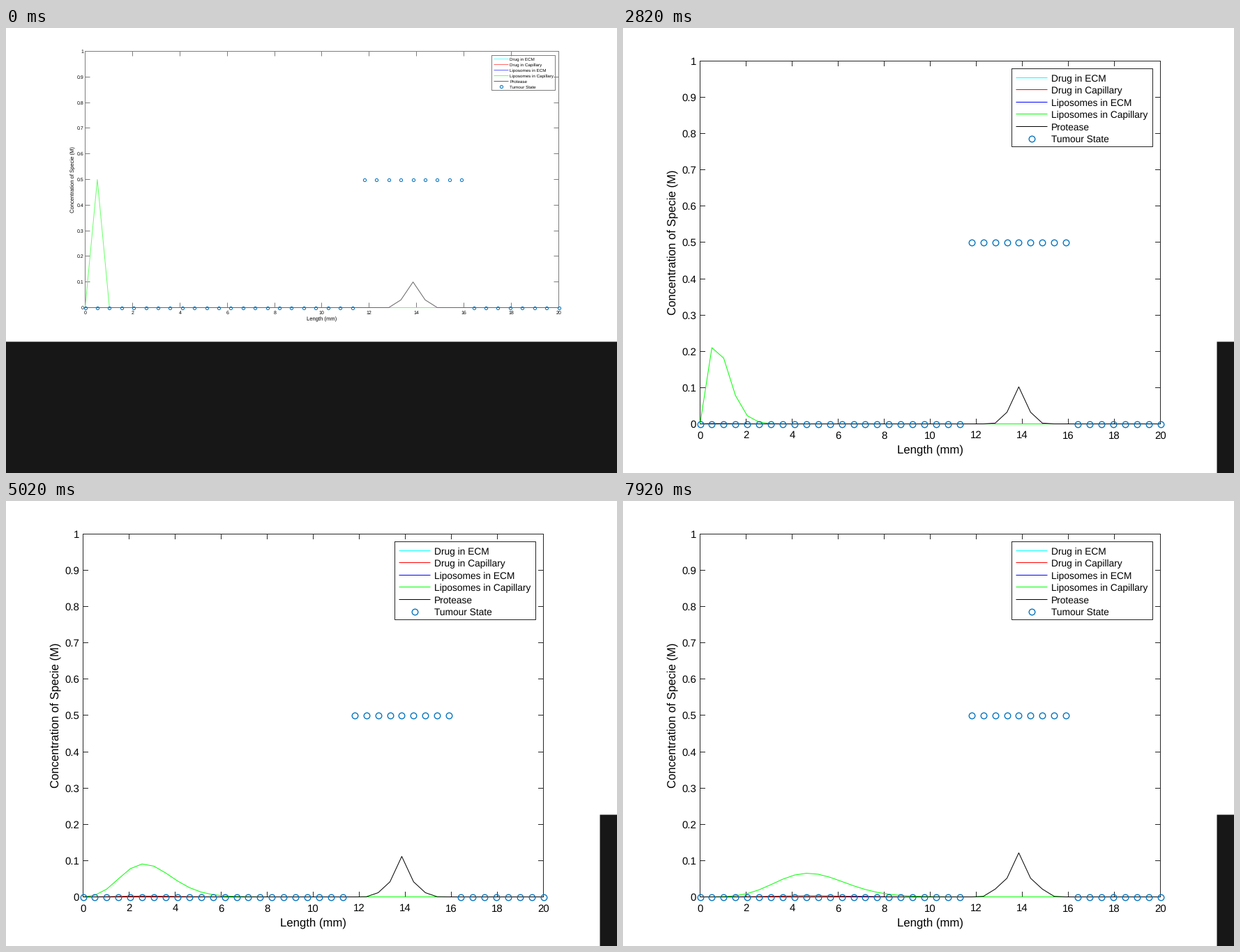
Write a matplotlib script that moves like this. It is 876 px wide and 639 px high and loops after 8 s.

```python
import math

import matplotlib.pyplot as plt
import numpy as np
from matplotlib.animation import FuncAnimation
from matplotlib.colors import to_rgb
from matplotlib.patches import Rectangle

WIDTH, HEIGHT, DPI = 876, 639, 72  # at 72 dpi one point is one pixel
FRAMES, INTERVAL = 80, 100
INK, DARK, TUMOUR = "#262626", "#171717", "#0072BD"
SERIES = [
    ("Drug in ECM", "#00FFFF"),
    ("Drug in Capillary", "#FF0000"),
    ("Liposomes in ECM", "#0000FF"),
    ("Liposomes in Capillary", "#00FF00"),
    ("Protease", "#000000"),
]

plt.rcParams.update({
    "font.family": "Liberation Sans",
    "text.hinting": "none",
    "path.snap": False,
    "path.simplify": False,
})

NODES = np.arange(40)
X = NODES * 20 / 39
TUMOUR_STATE = np.where((NODES >= 23) & (NODES <= 31), 0.5, 0)

# Solver time per frame: slow start, then faster steps (frame, time, slope).
CLOCK = [(1, 0, 0), (18, 0.21, 0.036), (28, 0.863, 0.098),
         (43, 3.2, 0.2), (57, 6.0, 0.16), (79, 8.65, 0.09)]


def solver_time(frame):
    frame = max(frame, 1)
    for (n0, t0, m0), (n1, t1, m1) in zip(CLOCK, CLOCK[1:]):
        if frame <= n1:
            h = n1 - n0
            s = (frame - n0) / h
            return (t0 * (1 + 2 * s) * (1 - s) ** 2 + m0 * h * s * (1 - s) ** 2
                    + t1 * s * s * (3 - 2 * s) + m1 * h * s * s * (s - 1))


def concentrations(t):
    """Upwind advection spreads the single-node dose as a Poisson pulse."""
    pulse = np.array([0] + [0.5 * math.exp(-t) * t ** k / math.factorial(k)
                            for k in range(39)])
    released = 0.005 * t
    drug_capillary = pulse * released
    liposomes_ecm = 0.0009 * (t / 8.65) ** 4 * np.exp(-((X - 7) / 0.7) ** 2)
    protease = np.zeros(40)
    protease[25:30] = np.array([0, 0.03, 0.1, 0.03, 0]) + 0.00248 * t
    protease[[24, 30]] = 2e-5 * t * t
    return [np.zeros(40), drug_capillary, liposomes_ecm,
            pulse * (1 - released), protease]


def crisp(value):
    """Centre of the pixel that holds the value."""
    return math.ceil(value) - 0.5


class Chart:
    def __init__(self, ax, box, tick, tick_size, label_size, x_label, y_label,
                 x_tick_y, y_tick_x, marker, edge, strength, legend):
        self.ax, self.artists, self.strength = ax, [], strength
        self.left, self.top, self.right, self.bottom = box
        self.marker = dict(marker="o", ms=marker, mew=edge, mfc="none",
                           mec=TUMOUR, ls="none")
        self.draw_axes(tick, tick_size, x_tick_y, y_tick_x)
        self.text((self.left + self.right) / 2, x_label, "Length (mm)",
                  label_size, "center")
        self.text(y_label, (self.top + self.bottom) / 2,
                  "Concentration of Specie (M)", label_size, "center", 90)
        self.curves = [self.line(self.px(X), self.py(0 * X), color)
                       for _, color in SERIES]
        self.keep(ax.plot(self.px(X), self.py(TUMOUR_STATE), **self.marker)[0])
        self.draw_legend(*legend)

    def px(self, x):
        return self.left + (self.right - self.left) * x / 20

    def py(self, y):
        return self.bottom - (self.bottom - self.top) * y

    def keep(self, artist):
        self.artists.append(artist)
        return artist

    def line(self, x, y, color):
        shade = 1 - self.strength * (1 - np.array(to_rgb(color)))
        return self.keep(self.ax.plot(x, y, color=shade, lw=1)[0])

    def text(self, x, y, words, size, ha="left", rotation=0):
        # Centre the capitals on the given point.
        drop = 0.36 * size
        x, y = (x + drop, y) if rotation else (x, y + drop)
        self.keep(self.ax.text(x, y, words, size=size, ha=ha, va="baseline",
                               rotation=rotation, rotation_mode="anchor",
                               color="black"))

    def frame(self, left, top, right, bottom):
        self.line([left, right, right, left, left],
                  [top, top, bottom, bottom, top], INK)

    def draw_axes(self, tick, size, x_tick_y, y_tick_x):
        left, top, right, bottom = self.left, self.top, self.right, self.bottom
        self.frame(left, top, right, bottom)
        for value in range(0, 21, 2):
            x = crisp(self.px(value))
            self.line([x, x], [bottom, bottom - tick], INK)
            self.line([x, x], [top, top + tick], INK)
            self.text(x, x_tick_y, str(value), size, "center")
        for tenth in range(11):
            y = crisp(self.py(tenth / 10))
            self.line([left, left + tick], [y, y], INK)
            self.line([right, right - tick], [y, y], INK)
            self.text(y_tick_x, y, f"{tenth / 10:g}", size, "right")

    def draw_legend(self, box, row, step, key, text_x, size):
        left, top, right, bottom = box
        self.keep(self.ax.add_patch(Rectangle(
            (left, top), right - left, bottom - top, fc="white", ec="none")))
        self.frame(*box)
        for i, (name, color) in enumerate(SERIES):
            y = row + i * step
            self.line(key, [crisp(y)] * 2, color)
            self.text(text_x, y + 0.3, name, size)
        y = row + 5 * step
        self.keep(self.ax.plot([sum(key) / 2], [y], **self.marker)[0])
        self.text(text_x, y + 0.3, "Tumour State", size)

    def show(self, visible):
        for artist in self.artists:
            artist.set_visible(visible)

    def update(self, t):
        for curve, values in zip(self.curves, concentrations(t)):
            curve.set_ydata(self.py(values))


fig = plt.figure(figsize=(WIDTH / DPI, HEIGHT / DPI), dpi=DPI, facecolor="white")
ax = fig.add_axes([0, 0, 1, 1])
ax.set(xlim=(0, WIDTH), ylim=(HEIGHT, 0))
ax.axis("off")

backdrop = ax.add_patch(Rectangle((0, 450.5), WIDTH, HEIGHT, fc=DARK, ec="none"))
wide = Chart(ax, (113.5, 33.5, 792.5, 401.5), 6.5, 7, 7.6, 417.5, 95.5, 408.2,
             111.3, 4.2, 1, 0.6,
             ((696.5, 39.5, 787.5, 89.5), 44.5, 7.9, (700, 720), 722, 6.25))
large = Chart(ax, (110.5, 47.5, 770.5, 568.5), 7, 15, 16.75, 604.5, 69.7, 584,
              104.8, 8.6, 1.35, 1,
              ((557.5, 58.5, 759.5, 170.5), 71.5, 17.5, (564, 608), 614, 13.8))


def update(frame):
    opening = frame == 0
    wide.show(opening)
    large.show(not opening)
    backdrop.set_x(0 if opening else 851.5)
    (wide if opening else large).update(solver_time(frame))
    return []


animation = FuncAnimation(fig, update, frames=FRAMES, interval=INTERVAL,
                          init_func=lambda: update(0), repeat=True,
                          repeat_delay=0, blit=False)
plt.show()
```
